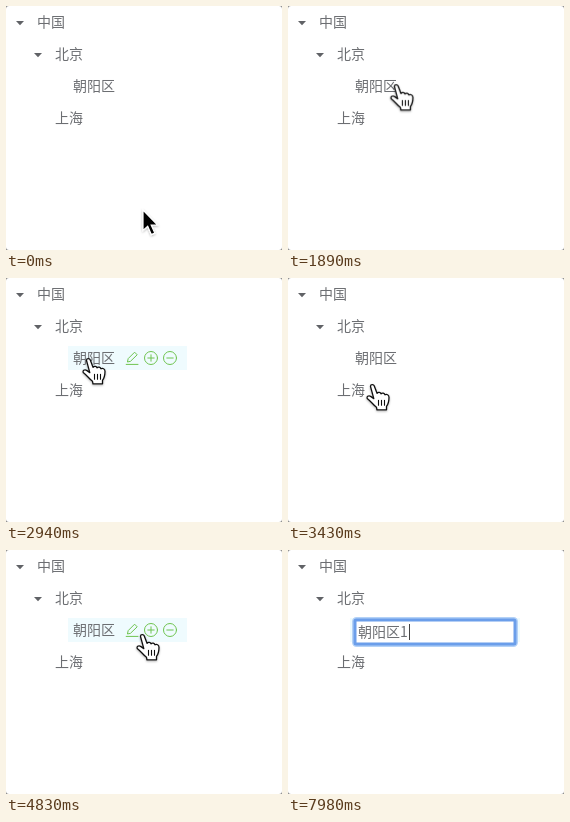
An HTML page that plays this animation: 276 by 244 pixels, repeating every 8000 ms.

```html
<!DOCTYPE html>
<html lang="zh-CN">
<head>
<meta charset="utf-8">
<title>Editable tree</title>
<style>
  html, body { margin: 0; width: 100%; height: 100%; overflow: hidden; background: #858585; }
  svg { display: block; width: 276px; height: 244px; }
  text { font: 14px "Noto Sans CJK SC", "Noto Sans CJK", "Noto Sans", sans-serif; fill: #6c6e72; }
  .icon { fill: none; stroke: #6fc450; stroke-width: 1; stroke-linecap: round; stroke-linejoin: round; }
  .hover { fill: #effbfe; }
  .tri { fill: #606266; }
  .anim { animation: 8s step-end infinite; }

  .root { animation-name: root; }
  .city { animation-name: city; }
  .area { animation-name: area; }
  .field { animation-name: field; }
  .caret { animation-name: caret; }
  .typed { animation-name: typed; }
  .arrow { animation-name: arrow; }
  .hand { animation-name: hand; }
  .beam { animation-name: beam; }
  .pointer { animation-name: travel; }

  @keyframes root { 0%, 32.375% { opacity: 0 } 28% { opacity: 1 } 100% { opacity: 0 } }
  @keyframes city { 0%, 28%, 35%, 100% { opacity: 0 } 26.25%, 32.375% { opacity: 1 } }
  @keyframes area { 0%, 38.5%, 66.5%, 100% { opacity: 0 } 35.875%, 47.25% { opacity: 1 } }
  @keyframes field { 0% { opacity: 0 } 66.5%, 100% { opacity: 1 } }
  @keyframes caret {
    0%, 70.875%, 84.875%, 98% { opacity: 0 }
    66.5%, 77.875%, 91.875% { opacity: 1 }
    98.875%, 100% { opacity: 1; transform: translateX(9px) }
  }
  @keyframes typed { 0% { opacity: 0 } 98.875%, 100% { opacity: 1 } }
  @keyframes arrow { 0% { opacity: 1 } 17.5%, 100% { opacity: 0 } }
  @keyframes hand { 0%, 66.5%, 100% { opacity: 0 } 17.5% { opacity: 1 } }
  @keyframes beam { 0%, 98.875%, 100% { opacity: 0 } 66.5% { opacity: 1 } }

  @keyframes travel {
    0% { transform: translate(137px, 204px); animation-timing-function: steps(3) }
    2.625% { transform: translate(129px, 157px) }
    14% { transform: translate(129px, 157px); animation-timing-function: steps(8) }
    21% { transform: translate(120px, 90px) }
    22.75% { transform: translate(120px, 90px); animation-timing-function: steps(6) }
    28% { transform: translate(47px, 19px); animation-timing-function: steps(4) }
    31.5% { transform: translate(58px, 34px); animation-timing-function: steps(2) }
    33.25% { transform: translate(60px, 47px); animation-timing-function: steps(4) }
    36.75% { transform: translate(82px, 80px); animation-timing-function: steps(5) }
    41.125% { transform: translate(88px, 113px); animation-timing-function: steps(2) }
    42.875% { transform: translate(84px, 106px) }
    43.75% { transform: translate(86px, 108px); animation-timing-function: steps(6) }
    49% { transform: translate(108px, 82px); animation-timing-function: steps(6) }
    54.25% { transform: translate(149px, 81px) }
    57.75% { transform: translate(149px, 81px); animation-timing-function: steps(3) }
    60.375% { transform: translate(136px, 84px) }
    62.125% { transform: translate(136px, 84px); animation-timing-function: steps(4) }
    65.625% { transform: translate(127px, 83px); animation-timing-function: steps(3) }
    68.25% { transform: translate(133px, 91px); animation-timing-function: steps(5) }
    72.625% { transform: translate(140px, 85px) }
    76.125% { transform: translate(140px, 85px); animation-timing-function: steps(4) }
    79.625%, 100% { transform: translate(155px, 87px) }
  }
</style>
</head>
<body>
<svg viewBox="0 0 276 244">
  <defs>
    <g id="edit" class="icon">
      <path d="M-5.8 6.4H6M-4.5 3.6L-3.8 .6L2.6-5.8L5.2-3.2L-1.3 3.1Z"/>
    </g>
    <g id="add" class="icon"><circle r="6.5"/><path d="M-3.2 0H3.2M0-3.2V3.2"/></g>
    <g id="remove" class="icon"><circle r="6.5"/><path d="M-3.2 0H3.2"/></g>
    <g id="tools"><use href="#edit" x="17"/><use href="#add" x="36"/></g>
    <path id="tri" class="tri" d="M-4-2H4L0 2.3Z"/>
    <filter id="shade" x="-50%" y="-50%" width="200%" height="200%">
      <feDropShadow dx="0" dy="1" stdDeviation="1" flood-opacity=".3"/>
    </filter>
    <path id="ibeam" d="M-5-12.5C-2-12.5 0-12 0-10C0-12 2-12.5 5-12.5M0-10V10M-5 12.5C-2 12.5 0 12 0 10C0 12 2 12.5 5 12.5M-3 2H3"/>
  </defs>

  <rect width="276" height="244" rx="3" fill="#fff"/>

  <g class="anim root">
    <rect class="hover" x="26" y="4" width="86" height="24"/>
    <use href="#tools" x="59" y="16"/>
  </g>
  <g class="anim city">
    <rect class="hover" x="44" y="36" width="105" height="24"/>
    <use href="#tools" x="77" y="48"/>
    <use href="#remove" x="132" y="48"/>
  </g>
  <g class="anim area">
    <rect class="hover" x="62" y="68" width="119" height="24"/>
    <use href="#tools" x="109" y="80"/>
    <use href="#remove" x="164" y="80"/>
  </g>

  <use href="#tri" x="14" y="17"/>
  <use href="#tri" x="32" y="49"/>
  <text x="31" y="21">中国</text>
  <text x="49" y="53">北京</text>
  <text x="67" y="85">朝阳区</text>
  <text x="49" y="117">上海</text>

  <g class="anim field">
    <rect class="hover" x="62" y="68" width="170" height="24"/>
    <rect x="66.5" y="69.5" width="161" height="25" rx="2" fill="none" stroke="#b4d2f7" stroke-width="5"/>
    <rect x="67" y="70" width="160" height="24" rx="1" fill="#fff" stroke="#6b9eea" stroke-width="3"/>
    <text x="70" y="87">朝阳区</text>
    <text class="anim typed" x="112" y="87">1</text>
  </g>
  <rect class="anim caret" x="112" y="74" width="1" height="16" fill="#444"/>

  <g class="anim pointer">
    <g class="anim arrow">
      <path filter="url(#shade)" d="M0 0V20.5L4.7 16.2L8.3 24.6L11.8 23.1L8.2 15H14.6Z" fill="#000" stroke="#fff" stroke-width="1.2"/>
    </g>
    <g class="anim hand">
      <g transform="translate(-6 -.2)" filter="url(#shade)" stroke="#111" stroke-width="1.3" stroke-linecap="round" stroke-linejoin="round">
        <path fill="#fff" d="M4.5 2.7C4.3 .5 7.5 .2 8.3 2.2L11 9.5C12 8 14.5 8.2 15 10C16 8.8 18.5 9.2 19 11C20.5 10 23 11 23 13.5C23 18 22.5 20 20.5 22.5V26H11L10.5 23.5C7 21 5 17.5 1.5 15C0 13 2.5 11 5 12.8L7.8 14.8Z"/>
        <path fill="none" stroke-width="1.1" d="M12.5 16.5V21.5M15.5 16.5V21.5M18.5 16.5V21.5"/>
      </g>
    </g>
    <g class="anim beam" fill="none" stroke-linecap="round">
      <use href="#ibeam" stroke="#fff" stroke-width="4"/>
      <use href="#ibeam" stroke="#000" stroke-width="2"/>
    </g>
  </g>
</svg>
</body>
</html>
```
